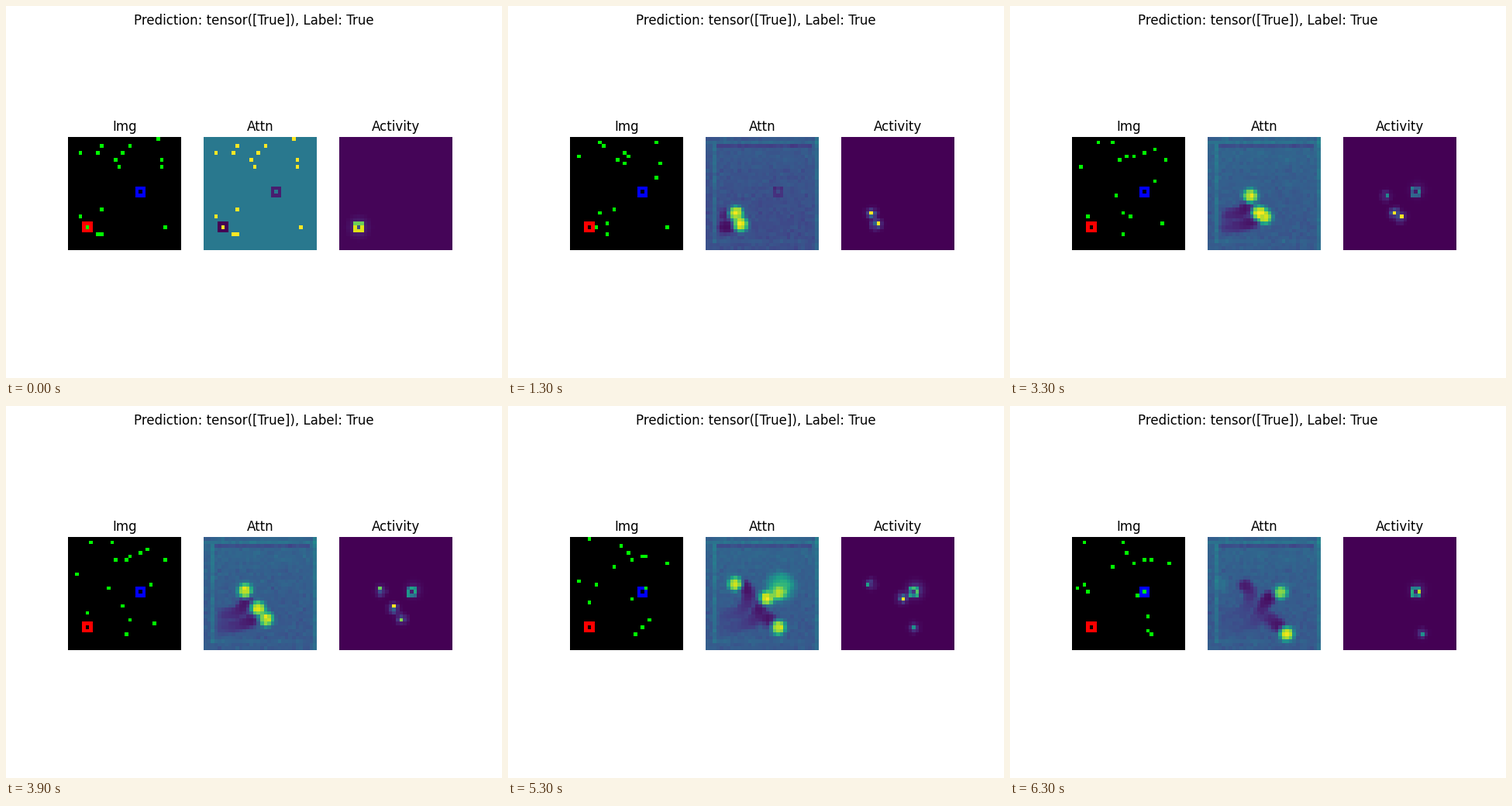
Write a matplotlib script that moves like this. It is 640 px wide and 480 px high and loops after 6.4 s.

```python
import numpy as np
import matplotlib.pyplot as plt
from matplotlib.animation import FuncAnimation

plt.rcParams["font.family"] = "DejaVu Sans"

N = 32
FRAMES = 64
INTERVAL = 100
RED = (5, 25)
BLUE = (20, 15)
ROWS, COLS = np.mgrid[0:N, 0:N]
T = np.arange(FRAMES)


def ease(t, start, end):
    """Smooth step from 0 at start to 1 at end."""
    u = np.clip((t - start) / (end - start), 0, 1)
    return u * u * (3 - 2 * u)


def curve(*points):
    """Smooth path through evenly timed (col, row) points."""
    p = np.array(points, float)
    slope = np.gradient(p, axis=0)
    u = T * (len(p) - 1) / (FRAMES - 1)
    i = np.minimum(u.astype(int), len(p) - 2)
    u = (u - i)[:, None]
    s = u * u * (3 - 2 * u)
    return (p[i] + s * (p[i + 1] - p[i])
            + u * (1 - u)**2 * slope[i] - u * u * (1 - u) * slope[i + 1])


def drift(start, end, rng):
    """Random wandering from start to end."""
    u = (T / (FRAMES - 1))[:, None]
    start, end = np.array(start), np.array(end)
    path = start + (end - start) * u
    for n in (1, 2, 3):
        path = path + rng.normal(0, 1 / n, 2) * np.sin(n * np.pi * u)
    return np.clip(path, 0, 27)


rng = np.random.default_rng(4)
trips = [
    ((25, 0), (22, 6)), ((9, 2), (14, 1)), ((17, 2), (20, 6)),
    ((3, 4), (1, 14)), ((8, 4), (3, 1)), ((26, 6), (27, 7)),
    ((13, 6), (11, 8)), ((15, 4), (17, 7)), ((14, 8), (15, 4)),
    ((26, 8), (20, 15)), ((27, 25), (21, 22)), ((8, 27), (4, 15)),
    ((9, 27), (21, 26)),
]
upper = curve((3, 22), (9.3, 20.6), (11.6, 16.3), (9.5, 13), (3, 13))
lower = curve((5, 25), (10.7, 23.9), (15.5, 22.1), (19.2, 24.3), (22, 27))
inner = curve((9, 20), (13, 20), (14, 21), (16.2, 17.4), (18, 16))
dots = [drift(a, b, rng) for a, b in trips] + [upper, lower, inner]

# Attention given to each followed dot over time
upper_level = ease(T, 4, 9) * (1 - .9 * ease(T, 51, 61))
lower_level = ease(T, 0, 4)
inner_level = ease(T, 24, 31) * (1 - ease(T, 54, 61))

# Path, attention, activity, time span of the dark wake
followed = [
    (upper, upper_level,
     upper_level**3 * (.7 + .3 * np.cos(2 * np.pi * (T - 46) / 33)), (6, 45)),
    (lower, lower_level, (.25 + .75 * lower_level) * (1 - .5 * ease(T, 34, 46)), (0, 63)),
    (inner, inner_level, inner_level, (30, 63)),
]
base_level = .25 + .15 * np.exp(-T / 2) + .05 * ease(T, 10, 25)
dot_glow = .6 * np.exp(-T / 2)
red_glow = 1 - ease(T, 0, 6)
ring_dip = .18 * np.exp(-T / 2) + .14 * (1 - ease(T, 0, 40))
goal_level = .9 * ease(T, 46, 52)
halo_level = .32 * ease(T, 46, 53) * (1 - ease(T, 53, 60))
ring_level = .5 * ease(T, 12, 44)
hot_level = ease(T, 38, 46) * .25 * (1 + np.cos(2 * np.pi * (T - 46) / 17))


def distance(centre):
    return np.hypot(COLS - centre[0], ROWS - centre[1])


def gauss(centre, size):
    return np.exp(-distance(centre)**2 / (2 * size**2))


def disc(centre, radius):
    return 1 / (1 + np.exp((distance(centre) - radius) / .35))


def ring(centre):
    return np.maximum(abs(COLS - centre[0]), abs(ROWS - centre[1])) == 1


def make_texture():
    """Grain with streaks that run along the borders."""
    tex = rng.normal(0, .014, (N, N)) + .02 * np.cos(ROWS / 8)
    tex[1] += .05
    tex[2, 3:30] -= .08
    tex[2:30, 2] += .08
    tex[29, 2:30] += .03
    tex[:, -1] += .08
    return tex


TEXTURE = make_texture()


def cells(k):
    return {tuple(np.rint(path[k]).astype(int)) for path in dots}


def draw_img(k):
    img = np.zeros((N, N, 3))
    img[ring(RED)] = (1, 0, 0)
    img[ring(BLUE)] = (0, 0, 1)
    for c, r in cells(k):
        img[r, c] = (0, 1, 0)
    return img


def wake(k):
    """Dark trace left where followed dots have been."""
    trace = np.zeros((N, N))
    for path, _, _, (first, last) in followed:
        for s in range(first, min(k - 3, last + 1)):
            age = k - s
            weight = np.exp(-(age / 38)**2) * ease(age, 2, 9)
            trace = np.maximum(trace, weight * np.exp(-(distance(path[s]) / 2)**4))
    return trace


def draw_attn(k):
    noise = np.random.default_rng(100 + k)
    a = base_level[k] + ease(k, 0, 6) * (TEXTURE + noise.normal(0, .006, (N, N)))
    a -= ring_dip[k] * ring(BLUE) + .4 * red_glow[k] * ring(RED)
    a *= 1 - .95 * wake(k)
    a += halo_level[k] * np.exp(-(distance((20.8, 13.5)) / 4)**4)
    for c, r in cells(k):
        a[r, c] += dot_glow[k]
    grain = noise.normal(0, .03, (N, N))
    for path, level, _, _ in followed:
        centre = path[max(k - 1, 0)]
        peak = .86 + .12 * gauss(centre, 1) + grain
        a += level[k] * disc(centre, 2) * (peak - a)
    a += goal_level[k] * disc((20.2, 15.2), 1.8) * (.9 + grain - a)
    return np.clip(a, 0, 1)


def draw_activity(k):
    noise = np.random.default_rng(300 + k)
    grain = noise.uniform(.5, 1.15, (N, N))
    a = np.full((N, N), .014 * np.exp(-k))
    for path, _, level, _ in followed:
        c, r = np.rint(path[k]).astype(int)
        spot = .4 * gauss(path[max(k - 1, 0)], .95) * grain
        spot[r, c] = 1
        a = np.maximum(a, level[k] * spot)
    a = np.maximum(a, ring_level[k] * ring(BLUE) * grain)
    a += (.2 * ring_level[k] + .3 * halo_level[k]) * gauss((20.5, 14.5), 1.5)
    c, r = (20, 16) if k < 55 else (21, 15)
    a[r, c] += hot_level[k]
    lit = ring(RED) * np.where(ROWS < RED[1], .78, .95)
    a = np.maximum(a, red_glow[k] * np.maximum(lit, .12 * gauss(RED, 2)))
    return np.clip(a, 0, 1)


fig, axes = plt.subplots(1, 3, figsize=(6.4, 4.8), dpi=100)
fig.suptitle("Prediction: tensor([True]), Label: True")
painters = [draw_img, draw_attn, draw_activity]
images = []
for ax, title, paint in zip(axes, ["Img", "Attn", "Activity"], painters):
    ax.set_title(title)
    ax.axis("off")
    images.append(ax.imshow(paint(0), vmin=0, vmax=1, interpolation="nearest"))


def update(k):
    for image, paint in zip(images, painters):
        image.set_data(paint(k))
    return images


anim = FuncAnimation(fig, update, frames=FRAMES, interval=INTERVAL, repeat=True,
                     repeat_delay=0)
plt.show()
```
